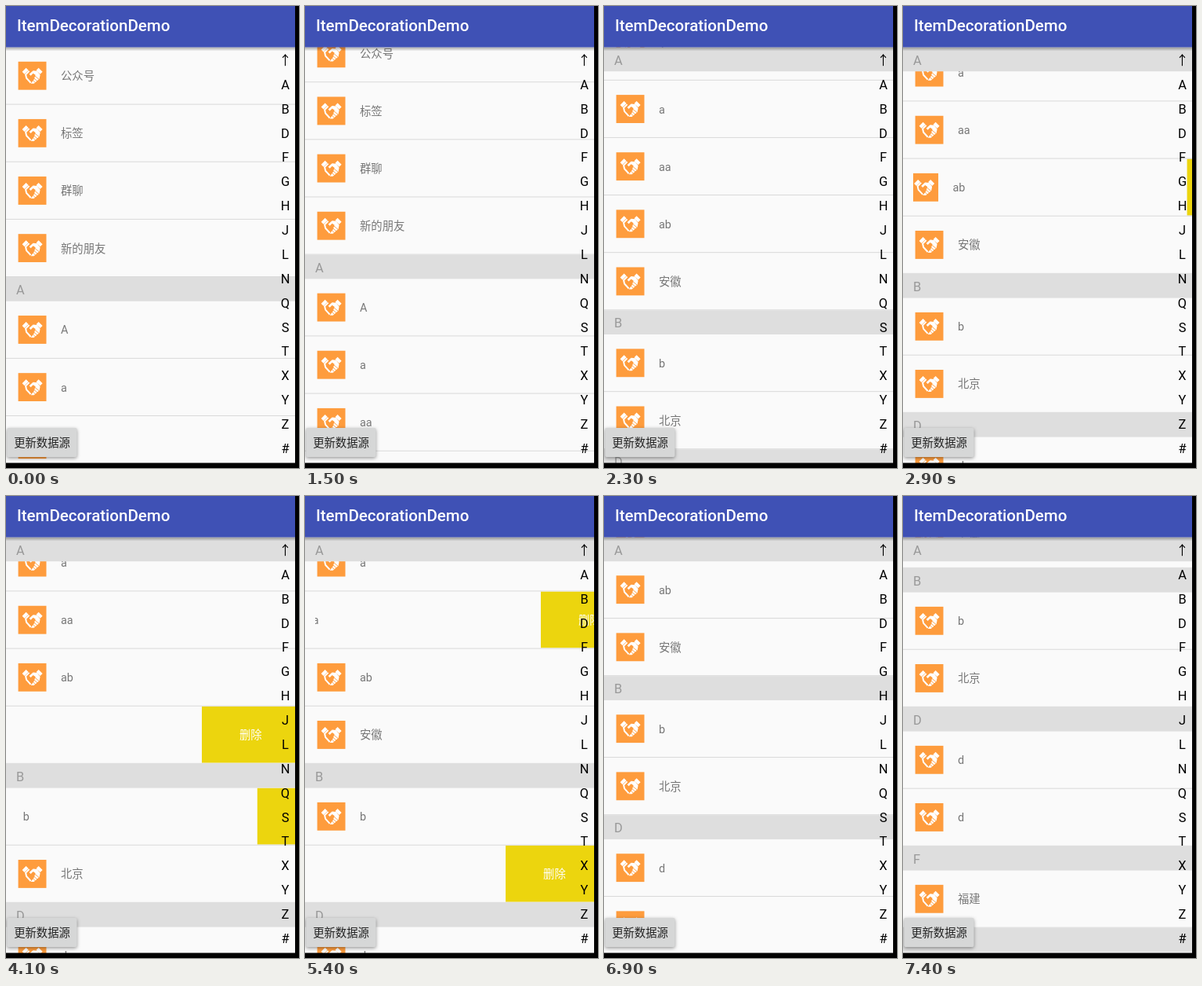
These frames come from a looping animation (374x588 px, 8000 ms). An HTML page with a canvas:

```html
<!DOCTYPE html>
<html lang="zh">
<head>
<meta charset="utf-8">
<style>
html, body { margin: 0; width: 100%; height: 100%; overflow: hidden; background: #000; }
canvas { display: block; }
</style>
</head>
<body>
<canvas id="stage" width="374" height="588"></canvas>
<script>
const ctx = document.getElementById('stage').getContext('2d');
const LOOP = 8000, TICK = 100;
const DP = 1.025;
const WIDTH = 369, BOTTOM = 581.5, BAR = 52.5, PAD = 13;
const ROW = 73.12, HEADER = 30 * DP, ICON = 35 * DP, DELETE = 126;
const BODY = 14 * DP, LETTER = 16 * DP, TITLE = 20 * DP;
const OPEN_MS = 190, CLOSE_MS = 350, CLOSE_DELAY = 30;
const FONT = 'Roboto, "Noto Sans CJK SC", "Noto Sans CJK", sans-serif';

const sections = [
  ['', '公众号', '标签', '群聊', '新的朋友'],
  ['A', 'A', 'a', 'aa', 'ab', '安徽'],
  ['B', 'b', '北京'],
  ['D', 'd', 'd'],
  ['F', '福建'],
  ['G', 'g']
];

const smooth = u => u * u * (3 - 2 * u);
const easeOut = u => 1 - (1 - u) ** 3;
const progress = (t, start, duration) => Math.min(1, Math.max(0, (t - start) / duration));

const scrolls = [
  { start: 1400, duration: 500, by: 273, ease: smooth },
  { start: 2100, duration: 700, by: 127.5, ease: easeOut },
  { start: 6800, duration: 556, by: 249, ease: easeOut }
];

// Opening a row closes the one before; the last entry only closes.
const swipes = [
  { row: 'ab', at: 2874 },
  { row: '安徽', at: 3420 },
  { row: 'b', at: 4020 },
  { row: '北京', at: 4560 },
  { row: 'aa', at: 5300 },
  { row: 'b', at: 6020 },
  { row: null, at: 6480 }
];

const scrollAt = t => scrolls.reduce((sum, s) =>
  sum + s.by * s.ease(progress(t, s.start, s.duration)), 0);

function offsetAt(t, name) {
  let open = 0;
  swipes.forEach(({ row, at }, i) => {
    if (row !== name) return;
    const next = swipes[i + 1];
    open += smooth(progress(t, at, OPEN_MS))
      - smooth(progress(t, next.at + CLOSE_DELAY, next.row ? CLOSE_MS : OPEN_MS));
  });
  return DELETE * open;
}

function rect(x, y, w, h, color) {
  ctx.fillStyle = color;
  ctx.fillRect(x, y, w, h);
}

function text(str, x, y, size, color, align = 'left', weight = 400) {
  ctx.font = `${weight} ${size}px ${FONT}`;
  ctx.textAlign = align;
  ctx.fillStyle = color;
  ctx.fillText(str, x, y);
}

const clasp = {
  hands: new Path2D('M5 13L10 8L13 11L8 16Z M31 13L26 8L23 11L28 16Z ' +
    'M14 16L19 11.5L24 12L28 17L27 22L20 28L16 28L20 23L22 17L19 15L16 18Z'),
  palm: new Path2D('M14 12L9.5 16.5L10.5 21L16 27'),
  fingers: new Path2D('M21 18L26.5 22.5M20 21L24.5 25M18.5 23.5L22 27')
};

function icon(x, y) {
  const orange = '#fe9c3d';
  ctx.save();
  ctx.translate(x, y);
  rect(0, 0, ICON, ICON, orange);
  ctx.fillStyle = ctx.strokeStyle = '#fff';
  ctx.fill(clasp.hands);
  ctx.lineWidth = 2;
  ctx.stroke(clasp.palm);
  ctx.strokeStyle = orange;
  ctx.lineWidth = 0.9;
  ctx.stroke(clasp.fingers);
  ctx.restore();
}

function drawRow(name, y, offset) {
  const baseline = y + 41.7;
  ctx.save();
  ctx.beginPath();
  ctx.rect(PAD, y, WIDTH - PAD, ROW - 1);
  ctx.clip();
  icon(15.6 - offset, y + 18.3);
  text(name, 70 - offset, baseline, BODY, '#777');
  if (offset > 0) {
    rect(WIDTH - offset, y, offset, ROW - 1, '#ecd50e');
    text('删除', WIDTH - offset + 48, baseline, BODY, '#fff');
  }
  ctx.restore();
  rect(0, y + ROW - 1, WIDTH, 1, '#d9d9d9');
}

function drawHeader(letter, y) {
  rect(0, y, WIDTH, HEADER, '#dedede');
  text(letter, PAD, y + 22, LETTER, '#999');
}

function drawList(t) {
  let y = BAR - scrollAt(t), sticky = '';
  for (const [letter, ...names] of sections) {
    if (letter) {
      if (y <= BAR) sticky = letter;
      drawHeader(letter, y);
      y += HEADER;
    }
    for (const name of names) {
      if (y > -ROW && y < BOTTOM) drawRow(name, y, offsetAt(t, name));
      y += ROW;
    }
  }
  if (sticky) drawHeader(sticky, BAR);
}

function drawIndex() {
  [...'↑ABDFGHJLNQSTXYZ#'].forEach((c, i) =>
    text(c, 356.5, 75 + i * 30.87, LETTER, '#000', 'center'));
}

function drawToolbar() {
  const shade = ctx.createLinearGradient(0, BAR, 0, BAR + 5);
  shade.addColorStop(0, 'rgba(0,0,0,.32)');
  shade.addColorStop(1, 'rgba(0,0,0,0)');
  rect(0, BAR, WIDTH, 5, shade);
  rect(0, 0, WIDTH, BAR, '#3f51b5');
  text('ItemDecorationDemo', 14, 32, TITLE, '#fff', 'left', 500);
}

function drawButton() {
  ctx.save();
  ctx.shadowColor = 'rgba(0,0,0,.4)';
  ctx.shadowBlur = 4;
  ctx.shadowOffsetY = 1.5;
  ctx.fillStyle = '#d6d7d7';
  ctx.beginPath();
  ctx.roundRect(1.3, 537, 88 * DP - 1, 36 * DP, 2);
  ctx.fill();
  ctx.restore();
  text('更新数据源', 46, 561, BODY, '#222', 'center');
}

function draw(now) {
  const t = Math.floor(now % LOOP / TICK) * TICK;
  rect(0, 0, WIDTH, 588, '#fafafa');
  drawList(t);
  drawIndex();
  drawButton();
  drawToolbar();
  rect(WIDTH, 0, 5, 588, '#000');
  rect(0, BOTTOM, 374, 7, '#000');
  requestAnimationFrame(draw);
}
requestAnimationFrame(draw);
</script>
</body>
</html>
```
